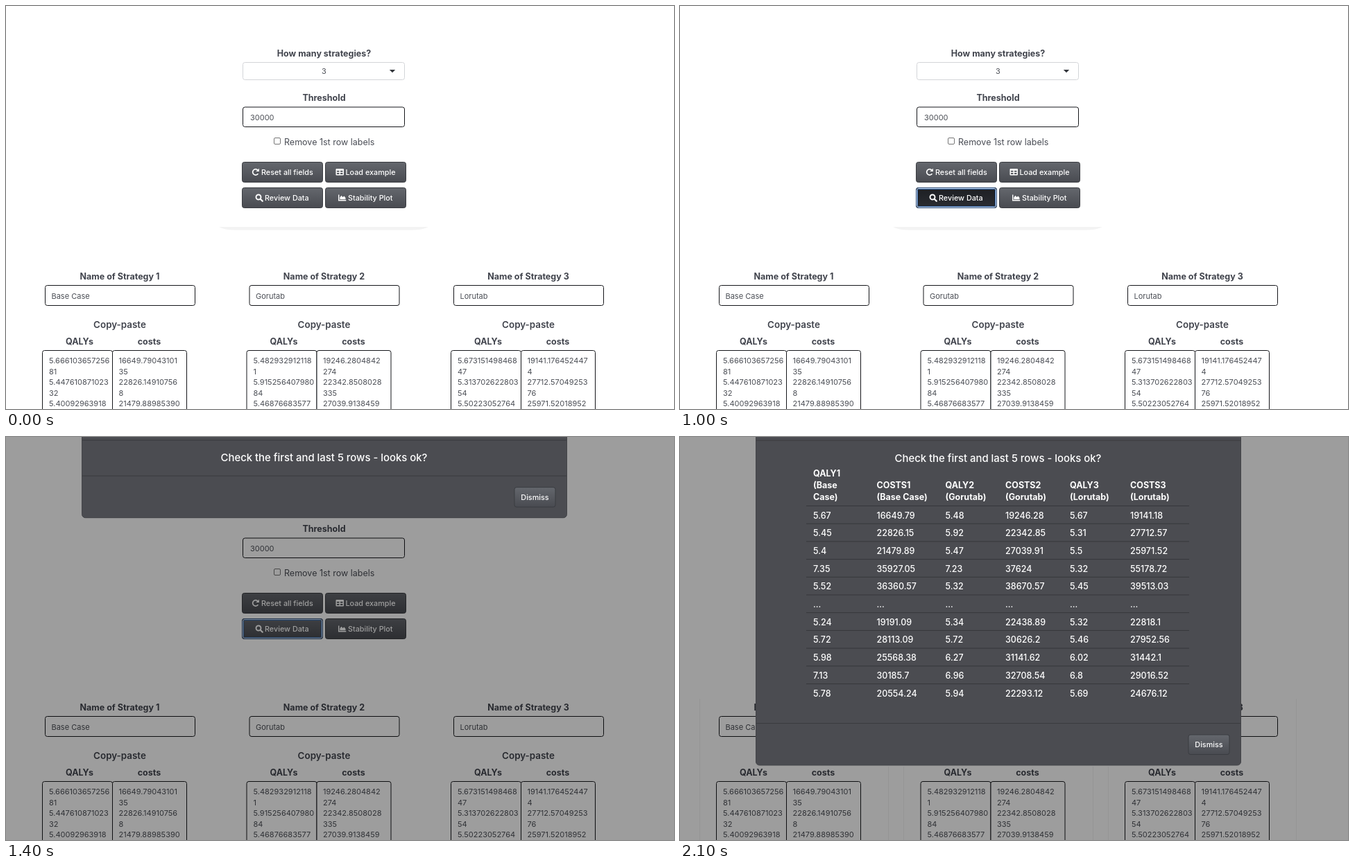
Recreate the animation shown at these times as an HTML page. Size 963x582 px, loop 3200 ms.

```html
<!DOCTYPE html>
<html lang="en">
<head>
<meta charset="utf-8">
<title>Review data dialog</title>
<style>
  html, body { margin: 0; width: 100%; height: 100%; overflow: hidden; background: #fff; }
  svg { display: block; width: 963px; height: 582px; font-family: Inter, "Liberation Sans", sans-serif; }
  .mid { text-anchor: middle; }
  .label { font-size: 12.5px; font-weight: 700; fill: #41444d; }
  .heading { font-size: 13.4px; font-weight: 600; fill: #41444d; }
  .value { font-size: 11px; fill: #4c4f56; }
  .check { font-size: 12.5px; fill: #4a4d55; }
  .btn { font-size: 10.8px; font-weight: 500; fill: #fff; }
  .title { font-size: 14.9px; font-weight: 500; fill: #fff; }
  .head { font-size: 12.5px; font-weight: 700; fill: #fff; }
  .cell { font-size: 12.5px; font-weight: 500; fill: #fff; }
</style>
</head>
<body>
<svg id="stage" viewBox="0 0 963 582"></svg>
<script>
const LOOP = 3200;
const STEP = 100;
const PITCH = 294.5;
const TABLE_HEIGHT = 357;

const strategies = [
  { name: 'Base Case',
    qalys: '5.666103657256 81 5.447610871023 32 5.40092963918',
    costs: '16649.79043101 35 22826.14910756 8 21479.88985390' },
  { name: 'Gorutab',
    qalys: '5.482932912118 1 5.915256407980 84 5.46876683577',
    costs: '19246.2804842 274 22342.8508028 335 27039.9138459' },
  { name: 'Lorutab',
    qalys: '5.673151498468 47 5.313702622803 54 5.50223052764',
    costs: '19141.176452447 4 27712.57049253 76 25971.52018952' }
];

const columns = [192, 283.5, 382.5, 469, 562, 649];
const rows = [
  '5.67 16649.79 5.48 19246.28 5.67 19141.18',
  '5.45 22826.15 5.92 22342.85 5.31 27712.57',
  '5.4 21479.89 5.47 27039.91 5.5 25971.52',
  '7.35 35927.05 7.23 37624 5.32 55178.72',
  '5.52 36360.57 5.32 38670.57 5.45 39513.03',
  '... ... ... ... ... ...',
  '5.24 19191.09 5.34 22438.89 5.32 22818.1',
  '5.72 28113.09 5.72 30626.2 5.46 27952.56',
  '5.98 25568.38 6.27 31141.62 6.02 31442.1',
  '7.13 30185.7 6.96 32708.54 6.8 29016.52',
  '5.78 20554.24 5.94 22293.12 5.69 24676.12'
];

const text = (x, y, cls, str) => `<text x="${x}" y="${y}" class="${cls}">${str}</text>`;
const rect = (x, y, w, h, rx, attrs) =>
  `<rect x="${x}" y="${y}" width="${w}" height="${h}" rx="${rx}" ${attrs}/>`;
const line = (x1, y1, x2, y2, color) =>
  `<path d="M${x1} ${y1}L${x2} ${y2}" stroke="${color}"/>`;
const field = (x, y, w, h, color = '#15161a') =>
  rect(x, y, w, h, 3, `fill="#fff" stroke="${color}"`);

const icons = {
  redo: `<path d="M9 2.6A4.2 4.2 0 1 0 9.4 7.6" fill="none" stroke="#fff" stroke-width="1.7"/>
    <path d="M10.9 0V4.6H6.3Z" fill="#fff"/>`,
  table: `<path fill="#fff" fill-rule="evenodd" d="M1 .5H10.5Q11.5 .5 11.5 1.5V9Q11.5 10 10.5 10H1Q0 10 0 9V1.500Q0 .5 1 .5Z
    M1.5 3.2V5.200H5V3.200ZM6.500 3.200V5.200H10V3.200ZM1.500 6.500V8.500H5V6.500ZM6.500 6.500V8.500H10V6.500Z"/>`,
  search: `<circle cx="4.500" cy="4.500" r="3.500" fill="none" stroke="#fff" stroke-width="1.900"/>
    <path d="M7.200 7.200L10.300 10.300" stroke="#fff" stroke-width="2.200" stroke-linecap="round"/>`,
  chart: `<path d="M.7 1V9.300H11.300" fill="none" stroke="#fff" stroke-width="1.400"/>
    <path d="M2.300 7.800V5L4.500 2.300L6.500 4.500L8.500 3L10.500 5.500V7.800Z" fill="#fff"/>`
};

function button(x, y, label, labelX, icon, iconX) {
  return rect(x + .5, y + .5, 116, 29, 3, 'fill="url(#face)" stroke="#3a3c41"') +
    `<g transform="translate(${iconX} ${y + 9.5})">${icons[icon]}</g>` +
    text(labelX, y + 18.8, 'btn', label);
}

function focusRing(id, x, y) {
  return `<g id="${id}" fill="none">
    ${rect(x + .5, y + .5, 116, 29, 3, 'stroke="#2b4d7c"')}
    ${rect(x + 1.5, y + 1.5, 114, 27, 2.5, 'stroke="#d5dfec"')}
    ${rect(x + 2.5, y + 2.5, 112, 25, 2, 'stroke="#2c61a6"')}</g>`;
}

function strategyCard({ name, qalys, costs }, i) {
  const lines = (x, str) =>
    str.split(' ').map((s, n) => text(x, 516 + n * 15.6, 'value', s)).join('');
  return `<g transform="translate(${i * PITCH} 0)">
    ${text(164, 394.5, 'label mid', `Name of Strategy ${i + 1}`)}
    ${field(56.5, 403.5, 216, 29)}${text(65.5, 423, 'value', name)}
    ${text(164, 464.7, 'heading mid', 'Copy-paste')}
    ${text(106, 488.5, 'label mid', 'QALYs')}${text(206.5, 488.5, 'label mid', 'costs')}
    ${field(52.5, 497.5, 101, 100)}${field(153.5, 497.5, 107, 100)}
    ${lines(62, qalys)}${lines(162.5, costs)}</g>`;
}

function halos() {
  const cards = strategies.map((_, i) =>
    rect(28 + i * PITCH, 353, 271.5, 260, 8, 'fill="#fff"')).join('');
  return `<g id="halos">
    ${rect(283, 22, 352, 318, 26, 'fill="#f9f9f9"')}
    ${rect(14, 345, 889, 280, 24, 'fill="#f9f9f9"')}
    ${rect(297, 30, 323, 289, 10, 'fill="#fff"')}${cards}</g>`;
}

function form() {
  return text(458.5, 72.5, 'label mid', 'How many strategies?') +
    field(341.5, 81.5, 233, 25, '#d3d5d8') + text(458.5, 98, 'value mid', '3') +
    '<path d="M552.8 92H561.200L557 96.300Z" fill="#33363b"/>' +
    text(458.5, 137, 'label mid', 'Threshold') +
    field(341.5, 146, 233, 28.5) + text(352, 165, 'value', '30000') +
    rect(386.5, 190.5, 9, 9, 1.5, 'fill="#fff" stroke="#767676"') +
    text(401, 200.8, 'check', 'Remove 1st row labels') +
    button(340, 225, 'Reset all fields', 368, 'redo', 354) +
    button(460, 225, 'Load example', 489.5, 'table', 475.5) +
    `<g id="pressed">${rect(340.5, 262.5, 116, 29, 3, 'fill="#222429"')}</g>`.replace('<g', '<g hidden') .replace(/^.*$/s, '') +
    button(340, 262, 'Review Data', 373, 'search', 359.5) +
    button(460, 262, 'Stability Plot', 493, 'chart', 479) +
    `<g id="pressed">${rect(340.5, 262.5, 116, 29, 3, 'fill="url(#down)"')}
      <g transform="translate(359.5 271.5)">${icons.search}</g>
      ${text(373, 280.8, 'btn', 'Review Data')}</g>` +
    focusRing('loadFocus', 460, 225) + focusRing('reviewFocus', 340, 262);
}

function table() {
  const heads = columns.map((x, i) => {
    const name = strategies[i >> 1].name;
    const kind = (i % 2 ? 'COSTS' : 'QALY') + ((i >> 1) + 1);
    const parts = i ? [kind, `(${name})`] : [kind, ...`(${name})`.split(' ')];
    return parts.map((s, n) =>
      text(x, 91 - (parts.length - 1 - n) * 17.2, 'head', s)).join('');
  }).join('');
  const body = rows.map((row, r) => {
    const y = 99.5 + r * 25.7;
    return line(182, y, 734, y, '#36373b') + row.split(' ').map((s, c) =>
      text(columns[c], y + 18, 'cell', s)).join('');
  }).join('');
  return `<g id="table">${heads}${body}</g>`;
}

function dialog() {
  return `<g id="dialog">
    <rect id="panel" x="109.500" y="-60" width="699" rx="5" fill="#4b4c51" stroke="#434448"/>
    ${line(110, 5, 808, 5, '#3a3b3f')}
    ${text(458.5, 35.8, 'title mid', 'Check the first and last 5 rows - looks ok?')}
    ${table()}
    <g id="footer">${line(110, 413.5, 808, 413.5, '#3a3b3f')}
      ${rect(733, 430, 59, 28.5, 3, 'fill="url(#face)" stroke="#3a3c41"')}
      ${text(762.5, 448.2, 'btn mid', 'Dismiss')}</g></g>`;
}

const gradient = (id, top, bottom) =>
  `<linearGradient id="${id}" x2="0" y2="1"><stop stop-color="${top}"/>
   <stop offset="1" stop-color="${bottom}"/></linearGradient>`;

const cardEdges = [28, 300, 322, 595, 617, 888].map((x, i) =>
  line(x + .5, i % 5 ? 476 : 378, x + .5, 582, '#f1f1f1')).join('');

document.getElementById('stage').innerHTML =
  `<defs>${gradient('face', '#64676d', '#494b51')}${gradient('down', '#1d1f23', '#2b2d32')}</defs>
  ${halos()}<g id="edges">${cardEdges}</g>
  <path id="shade" d="M307 319H609Q600 323.500 585 323.500H330Q315 323.500 307 319Z" fill="#f3f3f3"/>
  ${form()}${strategies.map(strategyCard).join('')}
  <rect id="backdrop" width="963" height="582"/>${dialog()}`;

const $ = id => document.getElementById(id);
const show = (id, on) => $(id).setAttribute('visibility', on ? 'visible' : 'hidden');
const clamp = v => Math.min(1, Math.max(0, v));

function draw(time) {
  const t = Math.floor(time % LOOP / STEP) * STEP;
  const filled = t >= 1500;

  show('loadFocus', t >= 400 && t < 1000);
  show('reviewFocus', t >= 1000);
  show('pressed', t === 1000);
  show('shade', t < 1100);
  show('halos', t === 1100);
  show('edges', filled);
  show('table', filled);

  $('backdrop').setAttribute('opacity', .385 * clamp((t - 1000) / 160));

  // The dialog slides down with a quadratic ease-out, then grows once its table arrives.
  const slide = -50 * (1 - clamp((t - 1125) / 300)) ** 2;
  const missing = filled ? 0 : TABLE_HEIGHT;
  $('dialog').setAttribute('opacity', clamp((t - 1143) / 150));
  $('dialog').setAttribute('transform', `translate(0 ${slide})`);
  $('panel').setAttribute('height', 534 - missing);
  $('footer').setAttribute('transform', `translate(0 ${-missing})`);
}

const start = performance.now();
function tick() {
  draw(performance.now() - start);
  requestAnimationFrame(tick);
}
tick();
</script>
</body>
</html>
```
